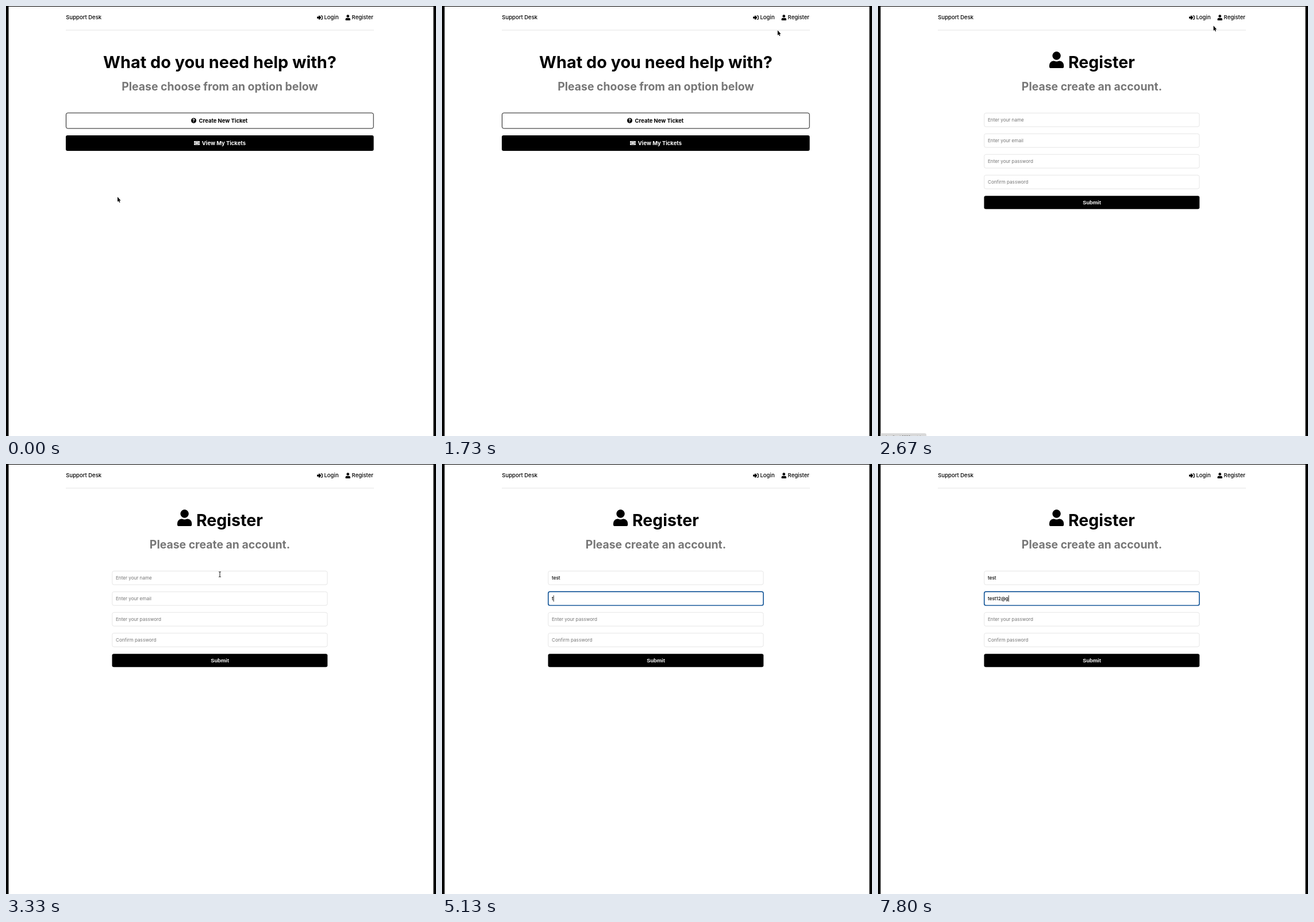
Recreate the animation shown at these times as an HTML page with a canvas. Size 748 by 748 pixels, loop 8 s.

```html
<!DOCTYPE html>
<html lang="en">
<head>
<meta charset="utf-8">
<title>Support Desk</title>
<style>
  html, body { margin: 0; width: 100%; height: 100%; overflow: hidden; background: #000; }
  canvas { display: block; width: 748px; height: 748px; }
</style>
</head>
<body>
<canvas id="stage"></canvas>
<script>
const SIZE = 748, LOOP = 8000, FPS = 15;
const SANS = 'Inter, "Open Sans", sans-serif';
const GREY = '#777', LINE = '#e3e3e3', BLUE = '#1d5c9c';

const canvas = document.getElementById('stage');
const ctx = canvas.getContext('2d');
const dpr = window.devicePixelRatio || 1;
canvas.width = canvas.height = Math.round(SIZE * dpr);

const FIELDS = [
  { y: 186, hint: 'Enter your name' },
  { y: 222, hint: 'Enter your email' },
  { y: 258, hint: 'Enter your password' },
  { y: 294, hint: 'Confirm password' }
];
const NAME_KEYS = { text: 'test', at: [3930, 4200, 4330, 4600] };
const MAIL_KEYS = { text: 'test12@g', at: [5130, 5330, 5600, 5800, 6930, 7200, 7530, 7800] };

// Pointer legs: start, end, then quadratic curve points.
const LEGS = [
  { from: 0, to: 400, path: [[194, 332], [238, 262], [282, 250.5]] },
  { from: 400, to: 800, path: [[282, 250.5], [300, 264], [299.5, 291.5]] },
  { from: 1070, to: 1870, path: [[299.5, 292], [470, 150], [605, 22.5]] },
  { from: 1930, to: 2130, path: [[605, 22.5], [604, 23], [602.5, 23]] },
  { from: 2530, to: 3330, path: [[602.5, 23], [480, 95], [372, 192]] }
];

const userIcon = new Path2D('M224 0a128 128 0 1 0 .1 0zM134 288h17q73 32 146 0h17' +
  'a134 134 0 0 1 134 134v42a48 48 0 0 1-48 48H48a48 48 0 0 1-48-48v-42a134 134 0 0 1 134-134z');
const arrowIcon = new Path2D('M24 176H160V80Q166 40 201 63L369 239Q376 256 369 273' +
  'L201 449Q166 472 160 432V336H24Q0 336 0 312V200Q0 176 24 176z');
const bracketIcon = new Path2D('M332 96H416A64 64 0 0 1 480 160V352A64 64 0 0 1 416 416H332');
const arrowCursor = new Path2D('M0 0V8.6L1.9 6.9L3.2 10L4.5 9.4L3.2 6.4H5.7z');
const handCursor = new Path2D('M1.3 1Q1.3 0 2.1 0T2.9 1V3.6Q3.7 3.1 4.2 3.9Q5 3.5 5.4 4.3' +
  'Q6.6 4.1 6.6 5.3V7Q6.6 8.2 5.9 9V10.2H2.4V9.3L.3 6.6Q-.4 5.5 .3 5.2Q.9 5 1.3 5.8z');

function text(str, x, y, size, weight, color = '#000', align = 'left', family = SANS) {
  ctx.font = `${weight} ${size}px ${family}`;
  ctx.fillStyle = color;
  ctx.textAlign = align;
  ctx.fillText(str, x, y);
}

function box(x, y, w, h, r, fill, stroke, width = 1) {
  ctx.beginPath();
  ctx.roundRect(x, y, w, h, r);
  if (fill) { ctx.fillStyle = fill; ctx.fill(); }
  if (stroke) { ctx.strokeStyle = stroke; ctx.lineWidth = width; ctx.stroke(); }
}

function dot(x, y, r, color) {
  ctx.beginPath();
  ctx.arc(x, y, r, 0, Math.PI * 2);
  ctx.fillStyle = color;
  ctx.fill();
}

function placed(x, y, scale, draw) {
  ctx.save();
  ctx.translate(x, y);
  ctx.scale(scale, scale);
  draw();
  ctx.restore();
}

function user(x, y, height, color) {
  placed(x, y, height / 512, () => {
    ctx.fillStyle = color;
    ctx.fill(userIcon);
  });
}

function drawHeader(hover) {
  const color = hover ? GREY : '#000';
  ctx.fillStyle = '#fff';
  ctx.fillRect(4.5, 1, 739, SIZE);
  ctx.fillStyle = LINE;
  ctx.fillRect(104, 41.5, 536, 1);
  text('Support Desk', 104.3, 23.4, 9.5, 500);
  placed(541, 15.2, 9.9 / 512, () => {
    ctx.fillStyle = ctx.strokeStyle = '#000';
    ctx.fill(arrowIcon);
    ctx.lineWidth = 64;
    ctx.stroke(bracketIcon);
  });
  text('Login', 553.5, 23.4, 9.5, 500);
  user(590.5, 15.2, 9.7, color);
  text('Register', 601.6, 23.4, 9.5, 500, color);
}

function drawHome() {
  text('What do you need help with?', 372, 108, 28.8, 700, '#000', 'center');
  text('Please choose from an option below', 372, 147.3, 19.4, 700, GREY, 'center');

  box(104.5, 186, 534.7, 27, 3, '#fff', '#000', 0.9);
  dot(326.5, 199.3, 4.5, '#000');
  text('?', 326.5, 201.9, 7.4, 800, '#fff', 'center');
  text('Create New Ticket', 335.6, 202.8, 9.45, 700);

  box(104, 225, 535.6, 27, 3, '#000');
  box(327, 235, 10, 6.8, 0.9, '#fff');
  box(329.2, 236.7, 5.6, 3.4, 0.2, null, '#000', 0.6);
  dot(327, 238.4, 0.9, '#000');
  dot(337, 238.4, 0.9, '#000');
  text('View My Tickets', 340.8, 241.8, 9.45, 700, '#fff');
}

function typed(keys, t) {
  return keys.text.slice(0, keys.at.filter(k => t >= k).length);
}

function drawForm(t) {
  user(298, 79.3, 28.8, '#000');
  text('Register', 331, 108, 28.5, 700);
  text('Please create an account.', 372, 147.3, 19.4, 700, GREY, 'center');

  const focus = t < 3390 ? -1 : t < 4860 ? 0 : 1;
  const values = [typed(NAME_KEYS, t), typed(MAIL_KEYS, t)];
  const caretOn = t < 6330 || t >= 6790;

  FIELDS.forEach((f, i) => {
    const value = values[i] || '';
    const active = i === focus;
    box(184.8, f.y + 0.2, 374.2, 23.8, 3, '#fff', active ? BLUE : LINE, active ? 1.7 : 0.9);
    text(value || f.hint, 191, f.y + 14.7, 8.1, value ? 500 : 400, value ? '#000' : '#757575');
    if (active && caretOn) {
      ctx.fillStyle = '#000';
      ctx.fillRect(191 + (value ? ctx.measureText(value).width : 0), f.y + 6.5, 0.8, 11);
    }
  });

  box(184.5, 330.3, 374.8, 23, 3, '#000');
  text('Submit', 372, 344.8, 9.33, 700, '#fff', 'center', '"Liberation Sans", Arial, sans-serif');
}

function drawStatus(alpha) {
  if (alpha <= 0) return;
  ctx.save();
  ctx.globalAlpha = alpha;
  box(4.5, 743.3, 79.7, 8, [0, 3, 0, 0], '#d9d9d9');
  text('localhost:3000/register', 14, 752, 6, 400, '#444');
  ctx.restore();
}

function pointerAt(t) {
  let leg = LEGS[0];
  for (const next of LEGS) if (t >= next.from) leg = next;
  const u = Math.min(1, (t - leg.from) / (leg.to - leg.from));
  const k = u * u * (3 - 2 * u);
  const [a, b, c] = leg.path;
  return [0, 1].map(i => (1 - k) ** 2 * a[i] + 2 * k * (1 - k) * b[i] + k * k * c[i]);
}

function inside([x, y], l, t, r, b) {
  return x >= l && x <= r && y >= t && y <= b;
}

function drawBeam(x, y) {
  const beam = new Path2D('M-1.8-4.6Q0-4.6 0-3.4Q0-4.6 1.8-4.6M0-3.6V3.6M-1.8 4.6Q0 4.6 0 3.4Q0 4.6 1.8 4.6');
  placed(x, y, 1, () => {
    ctx.strokeStyle = '#000';
    ctx.lineWidth = 0.9;
    ctx.stroke(beam);
  });
}

function drawPointer(p, kind) {
  if (kind === 'beam') return drawBeam(p[0], p[1]);
  const hand = kind === 'hand';
  placed(p[0], p[1], 1, () => {
    ctx.lineJoin = 'round';
    ctx.strokeStyle = hand ? '#000' : '#fff';
    ctx.fillStyle = hand ? '#fff' : '#000';
    ctx.lineWidth = hand ? 0.9 : 1.2;
    ctx.stroke(hand ? handCursor : arrowCursor);
    ctx.fill(hand ? handCursor : arrowCursor);
  });
}

function draw(ms) {
  const t = Math.floor((ms + 4) * FPS / 1000) * 1000 / FPS;
  const home = t < 2660;
  const p = pointerAt(t);
  const onLink = inside(p, 590, 13, 640, 27);
  const onButton = home && (inside(p, 104, 186, 640, 213) || inside(p, 104, 225, 640, 250));
  const onField = !home && FIELDS.some(f => inside(p, 184, f.y, 560, f.y + 24));

  ctx.setTransform(dpr, 0, 0, dpr, 0, 0);
  ctx.fillStyle = '#000';
  ctx.fillRect(0, 0, SIZE, SIZE);
  drawHeader(onLink);
  if (home) drawHome(); else drawForm(t);
  drawStatus(Math.min((t - 1930) / 200, (2870 - t) / 130, 1));
  if (t < 3990) drawPointer(p, onField ? 'beam' : onLink || onButton ? 'hand' : 'arrow');
}

const start = performance.now();
function tick() {
  draw((performance.now() - start) % LOOP);
  requestAnimationFrame(tick);
}
tick();
</script>
</body>
</html>
```
